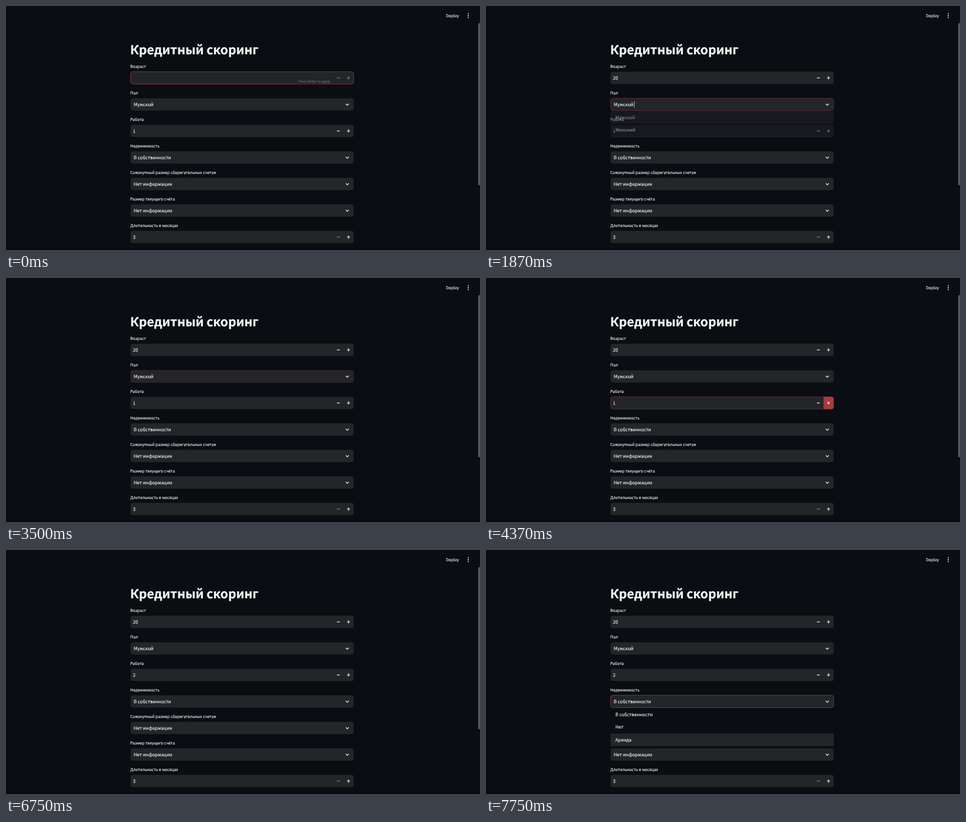
These frames come from a looping animation (800x414 px, 8 s). An HTML page:

```html
<!DOCTYPE html>
<html lang="ru">
<head>
<meta charset="utf-8">
<title>Кредитный скоринг</title>
<style>
html, body { margin: 0; width: 100%; height: 100%; overflow: hidden; background: #0a0d12; }
svg { display: block; width: 800px; height: 414px; }
text {
  font-family: "Noto Sans CJK JP", "Noto Sans CJK SC", "Noto Sans", sans-serif;
  fill: #fafafa; stroke: #fafafa; stroke-width: .1;
  text-rendering: geometricPrecision;
}
.title { font-size: 21.05px; font-weight: 700; stroke-width: .2; }
.label { font-size: 6.72px; }
.value { font-size: 7.7px; }
.hint { font-size: 5.75px; fill: #85878c; stroke: none; text-anchor: end; }
.field, .active { fill: #232529; }
.page { fill: #0a0d12; }
.ring { fill: none; stroke: #ff4b4b; stroke-width: .6; stroke-opacity: .78; }
.icon { fill: none; stroke: #fafafa; stroke-width: 1.2; }
.caret { fill: #e8e8ea; }
.dim { opacity: .45; }
.hot { fill: #ff4b4b; }

/* every part steps through the same 8 s loop */
[data-a] { animation: 8s step-end infinite; }
[data-a=ageFocus] { animation-name: ageFocus; }
[data-a=ageSteps] { animation-name: ageSteps; }
[data-a=age2] { animation-name: age2; }
[data-a=age20] { animation-name: age20; }
[data-a=ageCaret] { animation-name: ageCaret; }
[data-a=sexRing] { animation-name: sexRing; }
[data-a=sexCaret] { animation-name: sexCaret; }
[data-a=sexMenu] { animation-name: sexMenu; }
[data-a=jobHot] { animation-name: jobHot; }
[data-a=job1] { animation-name: job1; }
[data-a=job2] { animation-name: job2; }
[data-a=homeRing] { animation-name: homeRing; }
[data-a=homeCaret] { animation-name: homeCaret; }
[data-a=homeMenu] { animation-name: homeMenu; }
[data-a=homePick] { animation-name: homePick; }
[data-a=scroll] { animation-name: scroll; }

@keyframes ageFocus { 0% { opacity: 1 } 21.8%, 100% { opacity: 0 } }
@keyframes ageSteps { 0% { opacity: .45 } 4.6%, 100% { opacity: 1 } }
@keyframes age2 { 0% { opacity: 0 } 4.6% { opacity: 1 } 7.7%, 100% { opacity: 0 } }
@keyframes age20 { 0% { opacity: 0 } 7.7%, 100% { opacity: 1 } }
@keyframes ageCaret {
  0% { opacity: 0; transform: none }
  3.1% { opacity: 1; transform: none }
  4.6% { opacity: 1; transform: translateX(4.3px) }
  7.7% { opacity: 1; transform: translateX(8.6px) }
  15.6%, 100% { opacity: 0; transform: translateX(8.6px) }
}
@keyframes sexRing {
  0% { opacity: 0 } 21.8% { opacity: .3 } 23.3% { opacity: .6 } 24.9% { opacity: 1 }
  43.7% { opacity: .22 } 45.2% { opacity: .1 } 46.8%, 100% { opacity: 0 }
}
@keyframes sexCaret {
  0% { opacity: 0 } 23.3% { opacity: 1 } 31.2% { opacity: 0 }
  34.3% { opacity: 1 } 38.9%, 100% { opacity: 0 }
}
@keyframes sexMenu {
  0% { opacity: 0 } 23.3% { opacity: .5 } 24.9% { opacity: 1 } 43.7%, 100% { opacity: 0 }
}
@keyframes jobHot {
  0% { opacity: 0 } 54.6% { opacity: .6 } 56.2% { opacity: 1 }
  71.8% { opacity: .6 } 73.3% { opacity: .2 } 74.9%, 100% { opacity: 0 }
}
@keyframes job1 { 0% { opacity: 1 } 68.7%, 100% { opacity: 0 } }
@keyframes job2 { 0% { opacity: 0 } 68.7%, 100% { opacity: 1 } }
@keyframes homeRing { 0% { opacity: 0 } 85.8% { opacity: .6 } 87.4%, 100% { opacity: 1 } }
@keyframes homeCaret { 0% { opacity: 0 } 85.8% { opacity: 1 } 93.7%, 100% { opacity: 0 } }
@keyframes homeMenu { 0% { opacity: 0 } 85.8% { opacity: .5 } 87.4%, 100% { opacity: 1 } }
@keyframes homePick {
  0% { transform: none } 92.1% { transform: translateY(21.5px) }
  95.2%, 100% { transform: translateY(43px) }
}
@keyframes scroll { 0% { opacity: 1 } 85.8%, 100% { opacity: 0 } }
</style>
</head>
<body>
<svg id="stage" viewBox="0 0 800 414"></svg>
<script>
const left = 210, width = 377, rowGap = 45, itemHeight = 21.5;

const tag = name => name ? ` data-a="${name}"` : '';
const text = (cls, x, y, str, name) =>
  `<text class="${cls}" x="${x}" y="${y}"${tag(name)}>${str}</text>`;
const rect = (cls, x, y, w, h, r = 0, name) =>
  `<rect class="${cls}" x="${x}" y="${y}" width="${w}" height="${h}" rx="${r}"${tag(name)}/>`;
const icon = (d, name, cls = '') => `<path class="icon ${cls}" d="${d}"${tag(name)}/>`;

const box = (cls, cy, name) => rect(cls, left + .2, cy - 10.5, width - .4, 21, 4, name);
const caret = (x, cy, name) => rect('caret', x, cy - 5.6, .7, 11.2, 0, name);
const minus = (cy, name, cls) => icon(`M558.6 ${cy}h4.8`, name, cls);
const plus = (cy, name) => icon(`M575.7 ${cy}h4.8M578.1 ${cy - 2.4}v4.8`, name);
const chevron = cy => icon(`M573.4 ${cy - 1.2}l2.6 2.6l2.6 -2.6`);
const number = (cy, str, name) => text('value', 214.3, cy + 2.8, str, name);

function select(cy, value) {
  return text('value', 215.5, cy + 2.8, value) + chevron(cy);
}

function menu(cy, items, name, pickName) {
  const top = cy + 11.2;
  return `<g${tag(name)}>` +
    rect('page', left - .5, top, width + 1, items.length * itemHeight, 2) +
    rect('active', left, top, width, itemHeight, 1.5, pickName) +
    items.map((item, i) => text('value', 218.2, top + 13.4 + i * itemHeight, item)).join('') +
    '</g>';
}

const age = cy =>
  box('ring', cy, 'ageFocus') +
  `<g${tag('ageFocus')}>${text('hint', 547.2, cy + 7.5, 'Press Enter to apply')}</g>` +
  number(cy, '2', 'age2') + number(cy, '20', 'age20') +
  caret(214.6, cy, 'ageCaret') + minus(cy, 'ageSteps') + plus(cy, 'ageSteps');

const sex = cy =>
  box('ring', cy, 'sexRing') + select(cy, 'Мужской') + caret(249.8, cy, 'sexCaret');

const job = cy =>
  `<g${tag('jobHot')}>` + box('ring', cy) +
  `<path class="hot" d="M569.6 ${cy - 10.5}h13.2a4 4 0 0 1 4 4v13a4 4 0 0 1 -4 4h-13.2z"/></g>` +
  number(cy, '1', 'job1') + number(cy, '2', 'job2') + minus(cy) + plus(cy);

const home = cy =>
  box('ring', cy, 'homeRing') + select(cy, 'В собственности') + caret(280, cy, 'homeCaret');

const unknown = cy => select(cy, 'Нет информации');
const months = cy => number(cy, '3') + minus(cy, '', 'dim') + plus(cy);

const rows = [
  ['Возраст', age],
  ['Пол', sex],
  ['Работа', job],
  ['Недвижимость', home],
  ['Совокупный размер сберегательных счетов', unknown],
  ['Размер текущего счёта', unknown],
  ['Длительность в месяцах', months]
];
const rowY = i => 122 + i * rowGap;

const header =
  text('label', 742.6, 18.9, 'Deploy') +
  [13.1, 16.4, 19.7].map(y => `<circle cx="780.2" cy="${y}" r=".95" fill="#fafafa"/>`).join('') +
  `<g${tag('scroll')}><rect x="797" y="29" width="3" height="275" rx="1" fill="#55585c"/></g>`;

const form = rows.map(([name, draw], i) => {
  const cy = rowY(i);
  return text('label', 209.8, cy - 16.9, name) + box('field', cy) + draw(cy);
}).join('');

document.getElementById('stage').innerHTML =
  '<rect class="page" width="800" height="414"/>' +
  header + text('title', 209.6, 81.8, 'Кредитный скоринг') + form +
  menu(rowY(1), ['Мужской', 'Женский'], 'sexMenu') +
  menu(rowY(3), ['В собственности', 'Нет', 'Аренда'], 'homeMenu', 'homePick') +
  '<rect y="411.5" width="800" height="2.5" fill="#05070a"/>';
</script>
</body>
</html>
```
